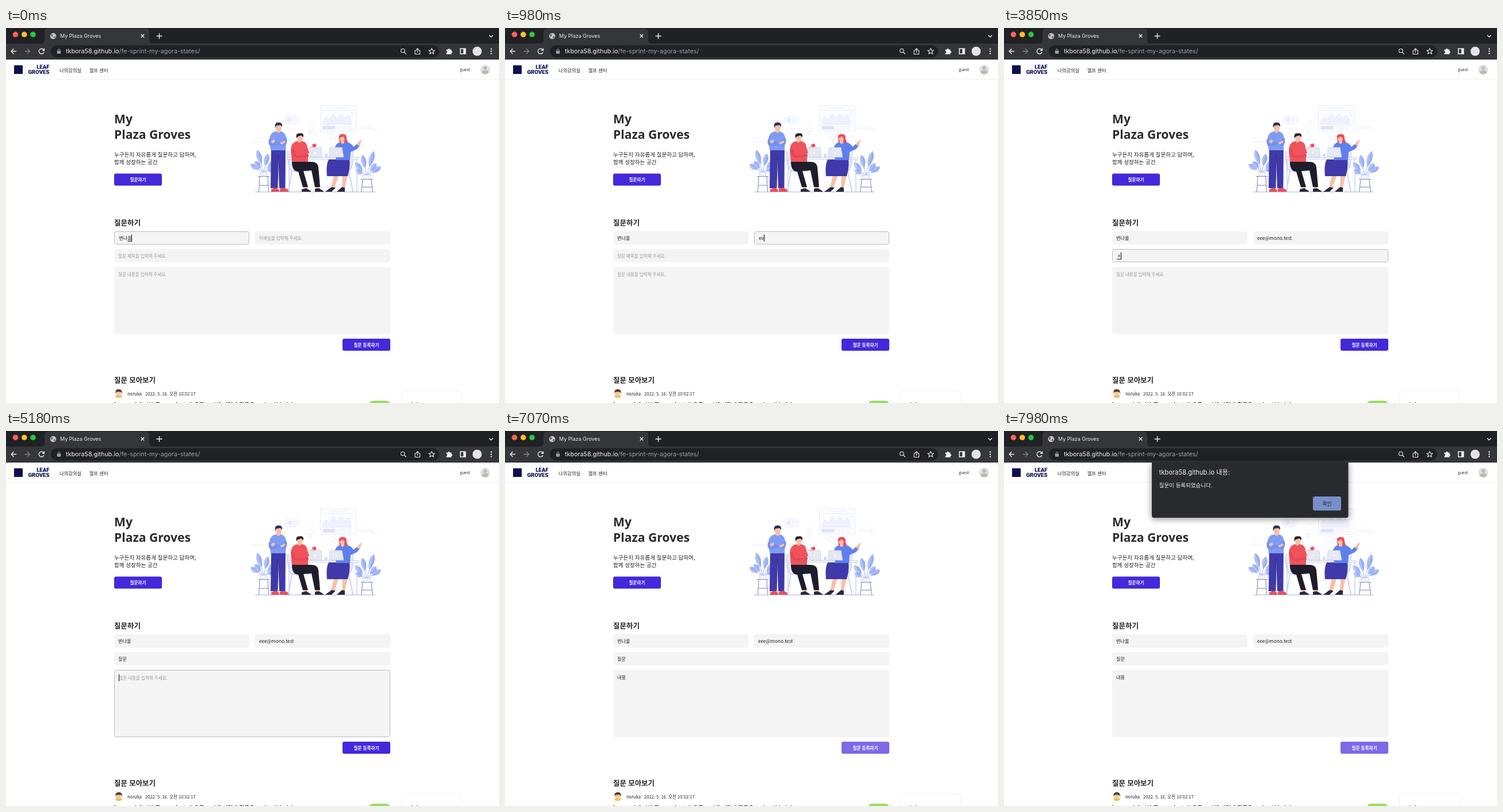
An HTML page that plays this animation: 857x653 px, repeating every 8000 ms.

```html
<!DOCTYPE html>
<html lang="ko">
<head>
<meta charset="utf-8">
<title>My Plaza Groves</title>
<style>
  html, body { margin: 0; width: 100%; height: 100%; overflow: hidden; background: #fff; }
  svg { display: block; width: 100vw; height: 100vh; }
  text { font: 8.2px 'Noto Sans CJK KR', 'Noto Sans CJK JP', 'Noto Sans KR', sans-serif; fill: #222; white-space: pre; }
  .ui { font-family: Inter, 'Noto Sans CJK KR', 'Noto Sans CJK JP', sans-serif; fill: #eee; }
  .bold { font-weight: 700; }
  .mid { text-anchor: middle; }
  .title { font: 800 21.1px 'Noto Sans', sans-serif; fill: #2b2b2d; }
  .logo { font: 900 9.6px Roboto, sans-serif; fill: #0b1050; text-anchor: end; }
  .nav { font-size: 8.3px; font-weight: 500; }
  .lead { font-size: 9.55px; }
  .meta { font-size: 7.55px; }
  .hint { font-size: 7.5px; fill: #999; }
  .btn { font-size: 7.6px; font-weight: 700; fill: #fff; text-anchor: middle; }
  .icon { fill: none; stroke: #e8eaed; stroke-width: 1.4; }
  .faint { fill: none; stroke: #e4e9fb; stroke-width: .8; }
  .skin { fill: #f8c0a8; }
</style>
</head>
<body>
<svg viewBox="0 0 857 653" preserveAspectRatio="none">
  <!-- browser frame -->
  <rect width="857" height="28" fill="#202124"/>
  <path d="M61 27Q67 27 67 21V7Q67 1 73 1H243Q249 1 249 7V21Q249 27 255 27Z" fill="#35363a"/>
  <rect y="27" width="857" height="28" fill="#35363a"/>
  <circle cx="16.5" cy="11.3" r="4.8" fill="#ff5f57"/>
  <circle cx="31.8" cy="11.3" r="4.8" fill="#febc2e"/>
  <circle cx="47" cy="11.3" r="4.8" fill="#28c840"/>
  <circle cx="82" cy="14" r="5.3" fill="#c3c6ca"/>
  <path d="M78 11Q82 10 81 13T79 15ZM83 15Q86 13 86 16L83 18Z" fill="#55585d"/>
  <text class="ui" x="94" y="17.2" style="font-size:9px">My Plaza Groves</text>
  <g class="icon">
    <path d="M234.7 11l5.4 5.4m0-5.400l-5.400 5.400M261.500 14h10m-5-5v10M840 12.500l3.300 3.300 3.300-3.300"/>
    <path d="M18 40.500H9m4.500-4.500L9 40.500l4.500 4.500"/>
    <path d="M32.500 40.500h9m-4.500-4.500l4.500 4.500-4.500 4.500" stroke="#7d8084"/>
    <path d="M65.500 38A4.500 4.500 0 1 0 66 42M66.500 35.500V39H63"/>
  </g>
  <rect x="78" y="30" width="675" height="21.5" rx="10.7" fill="#202124"/>
  <rect x="88.8" y="39.5" width="6.4" height="5.2" rx=".8" fill="#9aa0a6"/>
  <path d="M90.2 40v-1.5a1.8 1.8 0 0 1 3.600 0V40" class="icon" style="stroke:#9aa0a6;stroke-width:1"/>
  <text class="ui" x="104" y="44.3" style="font-size:10.75px">tkbora58.github.io<tspan fill="#9aa0a6">/fe-sprint-my-agora-states/</tspan></text>
  <g class="icon" style="stroke-width:1.1">
    <circle cx="689.8" cy="39.5" r="3.3"/><path d="M692.300 42l3.500 3.500"/>
    <path d="M713.500 39H711v6.500h8.500V39H717M715.300 43v-7m-2.200 2l2.200-2.300 2.200 2.300"/>
    <path d="M740 35.500l1.500 3.300 3.500.3-2.700 2.400.9 3.500-3.200-1.900-3.200 1.900.9-3.500-2.700-2.400 3.500-.3Z"/>
    <rect x="789.8" y="36" width="9" height="9" style="stroke-width:1.6"/>
  </g>
  <path d="M765.500 37.500h2.700a1.700 1.700 0 0 1 3.400 0h2.700v2.700a1.700 1.700 0 0 1 0 3.400v2.200h-8.800v-2.500a1.600 1.600 0 0 0 0-3.200ZM795 36h4v9h-4Z" fill="#f1f3f4"/>
  <circle cx="819" cy="40.5" r="8" fill="#e6e2ea"/>
  <g fill="#e8eaed"><circle cx="843.5" cy="36.5" r="1.2"/><circle cx="843.5" cy="40.5" r="1.2"/><circle cx="843.5" cy="44.5" r="1.2"/></g>

  <!-- page header -->
  <rect y="89" width="857" height="1" fill="#f0f0f0"/>
  <rect x="14" y="65" width="15" height="15" fill="#0b1050"/>
  <text class="logo" x="75.5" y="71.3">LEAF</text>
  <text class="logo" x="75.5" y="80">GROVES</text>
  <text class="nav" x="93" y="76.6">나의강의실</text>
  <text class="nav" x="144.7" y="76.6">헬프 센터</text>
  <text x="789" y="74.6" style="font-size:6.9px">guest</text>
  <circle cx="833" cy="72.5" r="8.5" fill="#e3dfdd"/>
  <circle cx="833" cy="69.8" r="3" fill="#bdb8b5"/>
  <path d="M827 78q0-4.500 6-4.500t6 4.500q-6 5-12 0Z" fill="#bdb8b5"/>

  <!-- hero -->
  <text class="title" x="188" y="166">My</text>
  <text class="title" x="188" y="193">Plaza Groves</text>
  <text class="lead" x="188" y="223.7">누구든지 자유롭게 질문하고 답하며,</text>
  <text class="lead" x="188" y="237.2">함께 성장하는 공간</text>
  <rect x="188" y="253.5" width="83" height="21" rx="3" fill="#4229dc"/>
  <text class="btn" x="229.5" y="267">질문하기</text>

  <g id="art">
    <g class="faint">
      <rect x="546.5" y="135.5" width="62" height="44.5" rx="1.5" fill="#fcfdff"/>
      <path d="M562 139.500h30M549 143.500h57M599 147h6m-6 3h6m-6 3h6M551 167.500h50"/>
      <path d="M551 167v-6l6-7 5 6 7-11 6 9 7-9 6 8 7-6 5 9v7Z" fill="#eff2fe"/>
      <rect x="551" y="170.5" width="21" height="6" fill="#dce3fb"/>
      <circle cx="579" cy="173.5" r="3"/><circle cx="588" cy="173.5" r="3"/><circle cx="597" cy="173.5" r="3"/>
      <path d="M613 172h26m-26 3h26M428 198h25m-20-7h10M455 205h8M495 175h8M519 153h2m11 9h3M459 157h2m150-5h2m10 10h3M634 178h12"/>
      <rect x="485" y="153" width="25.5" height="14" rx="7" fill="#f9faff"/>
      <circle cx="493" cy="160" r="3.5" fill="#e9eefd"/><path d="M499 157.500h7m-7 3h7m-7 3h4"/>
      <circle cx="529" cy="175" r="4.5"/><path d="M526.500 180h5v6h-5Zm-5-10l-2-2m17 2l2-2m-9-2v-3"/>
      <ellipse cx="566.5" cy="189" rx="7.5" ry="5"/><path d="M562 189l3 2 5-4M571 193l3 4"/>
    </g>
    <path d="M433 285.500H642" stroke="#a6b4e2"/>
    <g id="plants"></g>
    <g fill="none" stroke="#7583b5">
      <path d="M438 258.500h20M441 259l-1.500 26M455 259l1.500 26M440 274h16"/>
      <path d="M617 263.500h21M620 264l-2.500 21M635 264l2.500 21M619 277h17"/>
    </g>
    <path d="M442 251h12l-1 7h-10ZM620 256h15l-2 7h-11Z" fill="#f1f4fd" stroke="#b9c5ef" stroke-width=".7"/>

    <!-- standing figure -->
    <path d="M461 210H486L485.500 279H475L473 224 471.500 279H460Z" fill="#3f39a9"/>
    <path d="M473 222l-1 57" stroke="#2c2885" stroke-width="1.2"/>
    <path d="M461 285v-4l8-3 6 4v3ZM476 285v-5l8-2 9 5v2Z" fill="#ee4d5a"/>
    <path class="skin" d="M470 177h8v7h-8Z"/>
    <path d="M469 180Q459 182 458 193L460 213H486L487 192Q486 182 478 180L474 183Z" fill="#7e9cf4"/>
    <path d="M459 194Q457 205 464 204L484 199M486 192Q488 205 480 203L464 197" fill="none" stroke="#7390ef" stroke-width="4"/>
    <path class="skin" d="M476 200l8-4 2 3-7 4ZM460 197l6-3 2 4-5 3Z"/>
    <ellipse class="skin" cx="474" cy="174" rx="5" ry="6.5"/>
    <path d="M468 174Q466 164 474 164.500 481 164 480 172L477 169 470 170Z" fill="#2a2c63"/>

    <!-- chairs and table -->
    <path d="M490 214Q489 247 498 249H528M603 214Q604 248 594 249H566M497 249l-6 36M596 249l7 36" fill="none" stroke="#b9c6f3" stroke-width="1.5"/>
    <path d="M490 214Q494 212 498 222V247H496Q489 238 490 214ZM603 214Q599 212 596 224V247Q604 240 603 214Z" fill="#e6ebfd"/>

    <path d="M489 225.500H613V228.500H489Z" fill="#f7f8fe" stroke="#c0caec" stroke-width=".8"/>
    <path d="M492 229V285M610 229V285" stroke="#cad4f6" stroke-width="1.5"/>

    <!-- seated figures -->
    <path d="M497 233H530Q542 233 543 242L546 277H537L531 248 517 249 525 277H516L508 250Q497 250 497 233Z" fill="#1e1d2b"/>
    <path class="skin" d="M517 277h7v3h-7ZM538 277h7v3h-7Z"/>
    <path d="M514 285v-4l8-2 8 5v1ZM537 285v-5l7-1 8 5v1Z" fill="#29283a"/>
    <path class="skin" d="M507 195h7v6h-7Z"/>
    <path d="M506 197Q496 199 495 212L497 233H525V219L533 213 530 207 524 210Q524 198 514 197L510 200Z" fill="#f0535c"/>
    <path class="skin" d="M530 207l4-5 5 3-3 5-4 3Z"/>
    <path d="M532 203l6-2 2 5-5 2Z" fill="#ee4d5a"/>
    <path d="M499 211Q499 224 507 224L526 222" fill="none" stroke="#e04a55" stroke-width="4"/>
    <ellipse class="skin" cx="511" cy="191" rx="5" ry="6"/>
    <path d="M505 192Q503 183 510 183.500 518 182 517 190L513 187 507 189Z" fill="#211f2d"/>

    <path class="skin" d="M570 256l-5 22h6l8-22ZM585 256l-1 22h5l5-22Z"/>
    <path d="M555 285l11-8 7 1-7 7ZM575 285l9-8 5 1v7Z" fill="#29283a"/>
    <path d="M561 229H597Q599 242 594 258H558Q556 237 561 229Z" fill="#3f39a9"/>
    <path d="M579 192Q577 185 585 184.500 593 184 592 193L595 201H580Z" fill="#ee4d5a"/>
    <path class="skin" d="M582 196h6v6h-6Z"/>
    <path d="M580 199Q573 201 571 211L574 230H598L599 216 610 211 616 204 611 201 604 207Q599 198 590 199L585 202Z" fill="#5f80ec"/>
    <path d="M574 208Q572 219 578 223" fill="none" stroke="#4f71e1" stroke-width="4"/>
    <path class="skin" d="M610 203l4-6 5-3-2 6-3 6Z"/>
    <ellipse class="skin" cx="584.5" cy="192.5" rx="4.300" ry="5.500"/>
    <path d="M579 192Q579 184 586 185 591 186 590 194L586 189Z" fill="#ee4d5a"/>

    <path d="M526 208h20q2 0 2.200 2l1.300 15h-20.500l-4-15q-.5-2 1-2ZM565 208h18q2 0 1.500 2l2.500 15h-25l1-15q.2-2 2-2Z" fill="#e6e8f2" stroke="#c3c9de" stroke-width=".7"/>
    <circle cx="537" cy="217" r="1.3" fill="#fff"/><circle cx="574" cy="217" r="1.3" fill="#fff"/>
    <path d="M554 219h5v6h-5Z" fill="#d2dcfa"/>
  </g>

  <!-- form -->
  <text class="bold" x="188" y="344" style="font-size:12.5px">질문하기</text>
  <g id="form"></g>
  <path id="underline" stroke="#222"/>
  <path id="caret" stroke="#111"/>
  <rect id="submit" x="585" y="541" width="83" height="21" rx="3"/>
  <text class="btn" x="626.5" y="554.6">질문 등록하기</text>

  <!-- list -->
  <text class="bold" x="188" y="618" style="font-size:12.4px">질문 모아보기</text>
  <circle cx="196" cy="636.5" r="7.5" fill="#f4f0e4"/>
  <path d="M190 641q6-5 12 0l-1 2q-5 2.500-10 0Z" fill="#e8c65a"/>
  <circle cx="196" cy="636" r="4.300" fill="#f4c9a4"/>
  <path d="M190.500 636q-1-7 5.500-7t5.500 7l-2-2.500h-7Z" fill="#553a30"/>
  <text class="meta" x="211" y="639.7">noruka</text>
  <text class="meta" x="242" y="639.7">2022. 5. 16. 오전 10:02:17</text>
  <text class="bold" x="188" y="659.8" style="font-size:9.6px">koans 과제 진행 중 npm install 오류로 인해 이렇게 질문을 드리고 싶습니다</text>
  <rect x="631" y="649" width="37" height="16" rx="7" fill="#9cdb62"/>
  <rect x="687.5" y="631.5" width="105" height="60" rx="8" fill="#fff" stroke="#f0f0f0"/>
  <text class="bold" x="698" y="660.5" style="font-size:10px">필터</text>

  <!-- alert -->
  <g id="alert">
    <path d="M257 55H598.500V147.500Q598.500 151 595 151H260.500Q257 151 257 147.500Z" fill="#292a2d" style="filter:drop-shadow(0 2px 6px #0007)"/>
    <text class="ui" x="269.5" y="76" style="font-size:11.2px">tkbora58.github.io 내용:</text>
    <text x="269.5" y="97.7" style="font-size:9.5px;fill:#eee">질문이 등록되었습니다.</text>
    <rect id="ok" x="537" y="114" width="49" height="24.5" rx="3"/>
    <text class="mid" x="561.5" y="129.6" style="font-size:8.8px;font-weight:500">확인</text>
  </g>
</svg>
<script>
const $ = id => document.getElementById(id);
const LOOP = 8000, TICK = 70;

// Leaves fan out from each pot: [angle, length]
const leaf = (x, y, [angle, len]) =>
  `<g transform="translate(${x} ${y}) rotate(${angle})">
    <path d="M0 0V${-len}" stroke="#9db1f3" stroke-width=".8"/>
    <path d="M0 ${-len * .35}Q-9 ${-len * .75} 0 ${-len}Q9 ${-len * .75} 0 ${-len * .35}Z" fill="#b0c1fa"/>
    <path d="M0 ${-len * .35}Q9 ${-len * .75} 0 ${-len}Z" fill="#98aef6"/></g>`;
const fan = [[-58, 27], [-38, 25], [-16, 41], [12, 34], [42, 28], [64, 20]];
$('plants').innerHTML =
  fan.map(l => leaf(448, 252, l)).join('') +
  fan.map(([angle, len]) => leaf(627, 257, [-angle, len * 1.08])).join('');

const fields = [
  { x: 188.5, y: 354.5, w: 234, h: 22, final: '변나울', hint: '' },
  { x: 433.5, y: 354.5, w: 234, h: 22, final: 'eee@mono.test', hint: '이메일을 입력해 주세요.' },
  { x: 188.5, y: 385.5, w: 479, h: 22, final: '질문', hint: '질문 제목을 입력해 주세요.' },
  { x: 188.5, y: 416.5, w: 479, h: 116, final: '내용', hint: '질문 내용을 입력해 주세요.', multiline: true },
];
$('form').innerHTML = fields.map(f =>
  `<rect x="${f.x}" y="${f.y}" width="${f.w}" height="${f.h}" rx="3" fill="#f4f4f4"/><text/>`).join('');
fields.forEach((f, i) => {
  f.box = $('form').children[2 * i];
  f.label = $('form').children[2 * i + 1];
});

// [time, focused field, committed text, syllable being composed, caret hidden]
const typing = [
  [0, 0, '변나', '울'],
  [70, 1, ''], [560, 1, '', '', true], [840, 1, 'e'], [980, 1, 'ee'], [1400, 1, 'eee'],
  [1820, 1, 'eee@'], [1960, 1, 'eee@m'], [2100, 1, 'eee@mo'], [2240, 1, 'eee@mon'],
  [2380, 1, 'eee@mono.'], [2520, 1, 'eee@mono.te'], [2660, 1, 'eee@mono.test'],
  [2870, 2, ''], [3290, 2, '', '', true], [3850, 2, '', 'ㅈ'], [3990, 2, '', '지'], [4060, 2, '', '질'],
  [4200, 2, '질', 'ㅁ'], [4270, 2, '질', '무'], [4410, 2, '질', '문'], [4900, 2, '질', '문', true],
  [5180, 3, ''], [5530, 3, '', 'ㄴ'], [5670, 3, '', '내'], [5740, 3, '내', '요'], [5880, 3, '내', '용'],
  [6370, 3, '내', '용', true], [6860, 3, '내', '용'],
  [7070, 4, ''],
];

function drawForm(t) {
  const [, focus, text, composing = '', hidden] = typing.findLast(s => s[0] <= t);
  $('caret').setAttribute('d', '');
  $('underline').setAttribute('d', '');
  fields.forEach((f, i) => {
    const active = i === focus;
    const value = active ? text + composing : i < focus ? f.final : '';
    const x = f.x + (active ? 7.8 : 6.5);
    const y = f.multiline ? f.y + (active ? 16.5 : 15.5) : f.y + 14.5;
    f.box.setAttribute('stroke', active ? '#bcbcbc' : '#f4f4f4');
    f.label.setAttribute('class', value ? '' : 'hint');
    f.label.setAttribute('x', x);
    f.label.setAttribute('y', value ? y : y - .3);
    f.label.textContent = value || f.hint;
    if (!active) return;
    const end = value ? x + f.label.getComputedTextLength() : x;
    if (!hidden) $('caret').setAttribute('d', `M${Math.floor(end) + .5} ${y - 9.5}v12.5`);
    if (composing) {
      const start = x + (text ? f.label.getSubStringLength(0, text.length) : 0);
      $('underline').setAttribute('d', `M${start} ${Math.floor(y + 2) + .5}H${end}`);
    }
  });
}

function drawAlert(t) {
  const [opacity, lift] = t < 7140 ? [0, 0] : t < 7210 ? [.6, 5] : t < 7280 ? [.95, 1] : [1, 0];
  $('alert').setAttribute('opacity', opacity);
  $('alert').setAttribute('transform', `translate(0 ${-lift})`);
  const fade = Math.min(1, Math.max(0, (t - 7630) / 350));
  const mix = (a, b) => Math.round(a + (b - a) * fade);
  $('ok').setAttribute('fill', `rgb(${mix(138, 119)},${mix(177, 144)},${mix(247, 201)})`);
}

function frame() {
  const t = Math.floor(performance.now() % LOOP / TICK) * TICK;
  drawForm(t);
  $('submit').setAttribute('fill', t < 6720 ? '#4229dc' : '#7c6ae6');
  drawAlert(t);
  requestAnimationFrame(frame);
}
frame();
</script>
</body>
</html>
```
